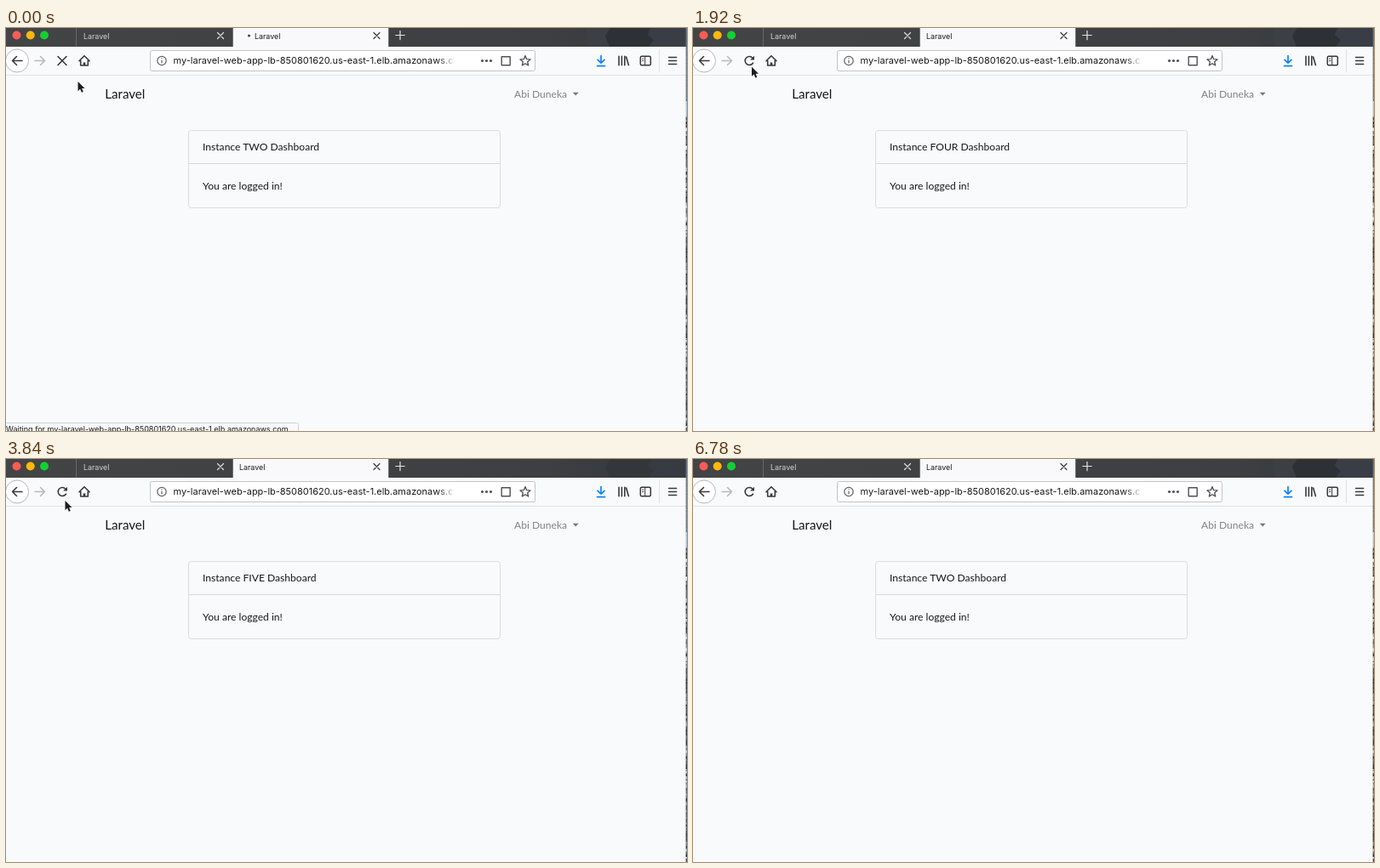
An HTML page that plays this animation: 800 px wide and 474 px high, repeating every 6930 ms.

```html
<!DOCTYPE html>
<html lang="en">
<head>
<meta charset="utf-8">
<title>Load balanced dashboard</title>
<style>
  html, body { margin: 0; width: 100%; height: 100%; overflow: hidden; background: #f9fafc; }
  svg { display: block; width: 100%; height: 100%; }
  text { white-space: pre; }
  .ui { font: 8.9px Inter, "Open Sans", sans-serif; fill: #18181b; }
  .page { font: 12.1px Lato, "Open Sans", sans-serif; fill: #15181b; }
  .icon { fill: none; stroke: #38383d; stroke-width: 1.6; stroke-linecap: round; stroke-linejoin: round; }
  .thin { stroke-width: 1.2; }
</style>
</head>
<body>
<svg viewBox="0 0 800 474" preserveAspectRatio="none">
  <defs>
    <linearGradient id="bar">
      <stop offset="0" stop-color="#434446"/>
      <stop offset=".8" stop-color="#3e3f42"/>
      <stop offset=".9" stop-color="#363a3f"/>
      <stop offset="1" stop-color="#353a41"/>
    </linearGradient>
    <linearGradient id="fade">
      <stop offset="0" stop-color="#fff" stop-opacity="0"/>
      <stop offset="1" stop-color="#fff"/>
    </linearGradient>
    <clipPath id="tabClip"><path d="M266.7 0H449.3V22H266.7z"/></clipPath>
    <clipPath id="urlClip"><path d="M190 28H526V50H190z"/></clipPath>
  </defs>

  <!-- tab bar -->
  <rect width="800" height="22" fill="url(#bar)"/>
  <g id="backdrop">
    <path d="M682 0H710L704 9 709 22H684L680 10z" fill="#3c3f43"/>
    <path d="M710 0H757L754 8 761 14 755 22H709L704 9z" fill="#2d3135"/>
    <path d="M757 0H800V22H755L761 14 754 8z" fill="#393e46"/>
  </g>
  <path d="M82.5 0V22" stroke="#66676a"/>
  <circle cx="12.5" cy="8.5" r="5" fill="#fc5b57"/>
  <circle cx="28.7" cy="8.5" r="5" fill="#fdb90d"/>
  <circle cx="45" cy="8.5" r="5" fill="#14cf33"/>
  <text class="ui" x="91" y="12.6" style="fill:#d2d2d4">Laravel</text>
  <path class="icon thin" d="M248.5 5.5l7 7m0-7l-7 7" style="stroke:#dededf"/>
  <path d="M266.7 0H449.3V22H266.7z" fill="#f9f9fb"/>
  <circle id="burst" cx="281" cy="10" r="0" fill="#c0defa" clip-path="url(#tabClip)"/>
  <ellipse id="dot" cx="285" cy="9" rx="1.6" ry="1.6"/>
  <text id="tabText" class="ui" x="274" y="12.6">Laravel</text>
  <path class="icon thin" d="M432 5.5l7 7m0-7l-7 7"/>
  <path class="icon thin" d="M457.8 8.5h10.4m-5.2-5.2v10.4" style="stroke:#e4e4e5"/>

  <!-- toolbar -->
  <rect y="22" width="800" height="33" fill="#f9fafb"/>
  <path d="M0 55.5H800" stroke="#e3e4e7"/>
  <circle cx="13" cy="38.5" r="13.5" fill="#fff" stroke="#b9b9bc"/>
  <path class="icon" d="M19 38.5H7.5m5-5l-5 5 5 5"/>
  <path class="icon" d="M34 38.5h11.5m-5-5l5 5-5 5" style="stroke:#b9babc"/>
  <g class="icon" id="reload">
    <path d="M70.4 41.2A5 5 0 1 1 70 35.2"/>
    <path d="M72 32.8V37.6H67.2z" fill="#38383d" stroke="none"/>
  </g>
  <g class="icon" id="stop">
    <path d="M61 33.5l10 10"/>
    <path id="slash" d="M61 43.5l10-10" pathLength="1" stroke-dasharray="1 2"/>
  </g>
  <path class="icon" d="M86 38.8l6-6 6 6M87.7 38.6V44H96.3V38.6"/>
  <path class="icon" d="M92 44V40.5" style="stroke-width:2.6;stroke-linecap:butt"/>

  <rect x="169.5" y="26.5" width="452" height="24" rx="2" fill="#fff" stroke="#c3c4c7"/>
  <circle class="icon thin" cx="183" cy="38.5" r="5.2" style="stroke:#606064"/>
  <path class="icon thin" d="M183 38v3M183 35.7v.1" style="stroke:#606064"/>
  <g clip-path="url(#urlClip)">
    <text class="ui" x="196.6" y="42.2" style="font-size:10.98px">my-laravel-web-app-lb-850801620.us-east-1.elb.amazonaws.com</text>
    <rect x="508" y="29" width="20" height="20" fill="url(#fade)"/>
  </g>
  <g fill="#515156">
    <circle cx="559.5" cy="38.5" r="1.6"/><circle cx="564.5" cy="38.5" r="1.6"/><circle cx="569.5" cy="38.5" r="1.6"/>
  </g>
  <rect class="icon" x="582.2" y="33.7" width="10" height="10" style="stroke:#515156;stroke-width:1.4"/>
  <path id="star" class="icon" style="stroke:#515156;stroke-width:1.3"/>
  <path class="icon" d="M699 32.5V41m-4-3.6l4 3.8 4-3.8M694.5 44.6h9" style="stroke:#0a84ff;stroke-width:1.7"/>
  <path class="icon" d="M720 33.3v10.4M723.4 33.3v10.4M726.8 33.3v10.4M728.6 34l2.8 9.6"/>
  <rect class="icon" x="745.3" y="33.3" width="12" height="10.4" rx="1.5" style="stroke-width:1.5"/>
  <path class="icon thin" d="M750.7 33.5v10M747.6 36.2h1.2m-1.2 2.3h1.2" style="stroke-width:1"/>
  <path d="M767.5 25V52" stroke="#dfe0e2"/>
  <path class="icon" d="M778.6 34.5h9m-9 4h9m-9 4h9"/>

  <!-- page -->
  <rect y="56" width="800" height="418" fill="#f9fafc"/>
  <text class="page" x="116.3" y="83" style="font-size:15.1px">Laravel</text>
  <text class="page" x="597" y="82" style="fill:#808285">Abi Duneka</text>
  <path d="M665.7 75.8h7l-3.5 3.6z" fill="#77797c"/>
  <rect x="214.5" y="120.5" width="366" height="91" rx="3" fill="#f9fafc" stroke="#dadce0"/>
  <path d="M215 159.5H580" stroke="#d7d9dc"/>
  <text id="heading" class="page" x="231" y="144"></text>
  <text class="page" x="231" y="189.6">You are logged in!</text>

  <g id="status">
    <rect id="statusBox" x="-2" y="464.5" height="14" rx="2" fill="#f9f9fa" stroke="#cfd0d3"/>
    <text id="statusText" class="ui" x="0" y="475.3" style="font-size:9px"></text>
  </g>
  <g id="edge"></g>
  <path id="cursor" d="M0 0V11.2L2.6 8.8 4.3 12.8 6.3 12 4.6 8.1H8z" fill="#1c1c1e" stroke="#fff" stroke-width="1" paint-order="stroke"/>
</svg>
<script>
const LOOP = 6930, TICKS = 47, STEP = LOOP / TICKS;
const $ = id => document.getElementById(id);
const set = (id, attrs) => { for (const k in attrs) $(id).setAttribute(k, attrs[k]); };
const show = (id, on) => set(id, { visibility: on ? 'visible' : 'hidden' });

// Page loads, in ticks: click, arrival, instance that answers
const loads = [
  { start: -5, end: 8, name: 'FOUR' },
  { start: 15, end: 21, name: 'FIVE' },
  { start: 28, end: 34, name: 'TWO' }
];

// Pointer path: tick, x, y
const path = [
  [0, 84.5, 63], [3, 88, 68], [6, 80, 66], [9, 75.5, 60], [12, 69, 46], [15, 69, 45],
  [17, 80.5, 71], [20, 85, 73], [24, 74, 54], [26, 69.5, 49], [28, 69, 45], [30, 82, 76],
  [33, 98, 118], [38, 98, 118], [41, 260, 210], [44, 735, 466], [45, 760, 492], [47, 760, 492]
];

function pointer(n) {
  const i = path.findIndex(p => p[0] > n), [a, b] = [path[i - 1], path[i]];
  const k = (n - a[0]) / (b[0] - a[0]);
  return `translate(${a[1] + (b[1] - a[1]) * k} ${a[2] + (b[2] - a[2]) * k})`;
}

function drawStatic() {
  let star = '';
  for (let i = 0; i < 10; i++) {
    const r = i % 2 ? 2.8 : 6.3, a = Math.PI * (i / 5 - .5);
    star += `${i ? 'L' : 'M'}${610 + r * Math.cos(a)} ${38.9 + r * Math.sin(a)}`;
  }
  set('star', { d: star + 'z' });

  // Sliver of the window behind
  let seed = 7, rows = '';
  const rand = () => (seed = seed * 16807 % 2147483647) / 2147483647;
  for (let y = 0; y < 474;) {
    const h = 1 + rand() * 3, v = Math.round(40 + rand() * rand() * 200);
    const fill = y < 84 ? '#6b747f' : y < 104 ? '#a3bcd4' : `rgb(${v},${v},${v + 5})`;
    rows += `<rect x="798.6" y="${y}" width="1.4" height="${h}" fill="${fill}"/>`;
    y += h;
  }
  $('edge').innerHTML = rows;
}

function draw(n) {
  const load = loads.filter(l => l.start <= n).pop();
  const i = loads.indexOf(load), busy = n < load.end;
  const age = busy ? n - load.start : n - load.end;
  const receiving = busy && n >= load.end - 2;
  const bursting = !busy && age < 3;

  $('heading').textContent = `Instance ${(busy ? loads[(i + 2) % 3] : load).name} Dashboard`;

  // Tab throbber and arrival flash
  show('dot', busy);
  set('dot', receiving
    ? { cx: 280, rx: 2.5, ry: 1.5, fill: '#0a84ff' }
    : { cx: 281 + 4.8 * Math.cos(n * 2 * Math.PI / 5.6 + .35), rx: 1.6, ry: 1.6, fill: '#4a4a4f' });
  set('burst', { r: bursting ? 24 + age * 55 + age * (age - 1) * 12 : 0, opacity: age > 1 ? .5 : 1 });
  set('tabText', { x: busy || bursting ? 292 : 274 });

  // Stop and reload button
  const stopping = busy ? age > 0 : age < 2;
  show('stop', stopping);
  show('reload', !stopping);
  set('stop', { opacity: busy ? 1 : .3 });
  set('reload', { opacity: !busy && age < 5 ? .35 : 1 });
  set('slash', { 'stroke-dasharray': `${busy ? Math.max(.01, Math.min(1, (age - 1) / 2)) : 1} 2` });

  show('status', busy && age > 0);
  set('statusBox', { width: receiving ? 394.5 : 345.5 });
  $('statusText').textContent = receiving
    ? 'Transferring data from fonts.googleapis.com…'
    : 'Waiting for my-laravel-web-app-lb-850801620.us-east-1.elb.amazonaws.com…';

  const dim = n > 15 && n < 29 || n > 34 && n < 43;
  set('backdrop', { opacity: dim ? .3 : 1 });
  set('cursor', { transform: pointer(n) });
}

let last = -1;
function frame() {
  const n = Math.floor((performance.now() % LOOP + 10) / STEP) % TICKS;
  if (n !== last) draw(last = n);
  requestAnimationFrame(frame);
}
drawStatic();
frame();
</script>
</body>
</html>
```
